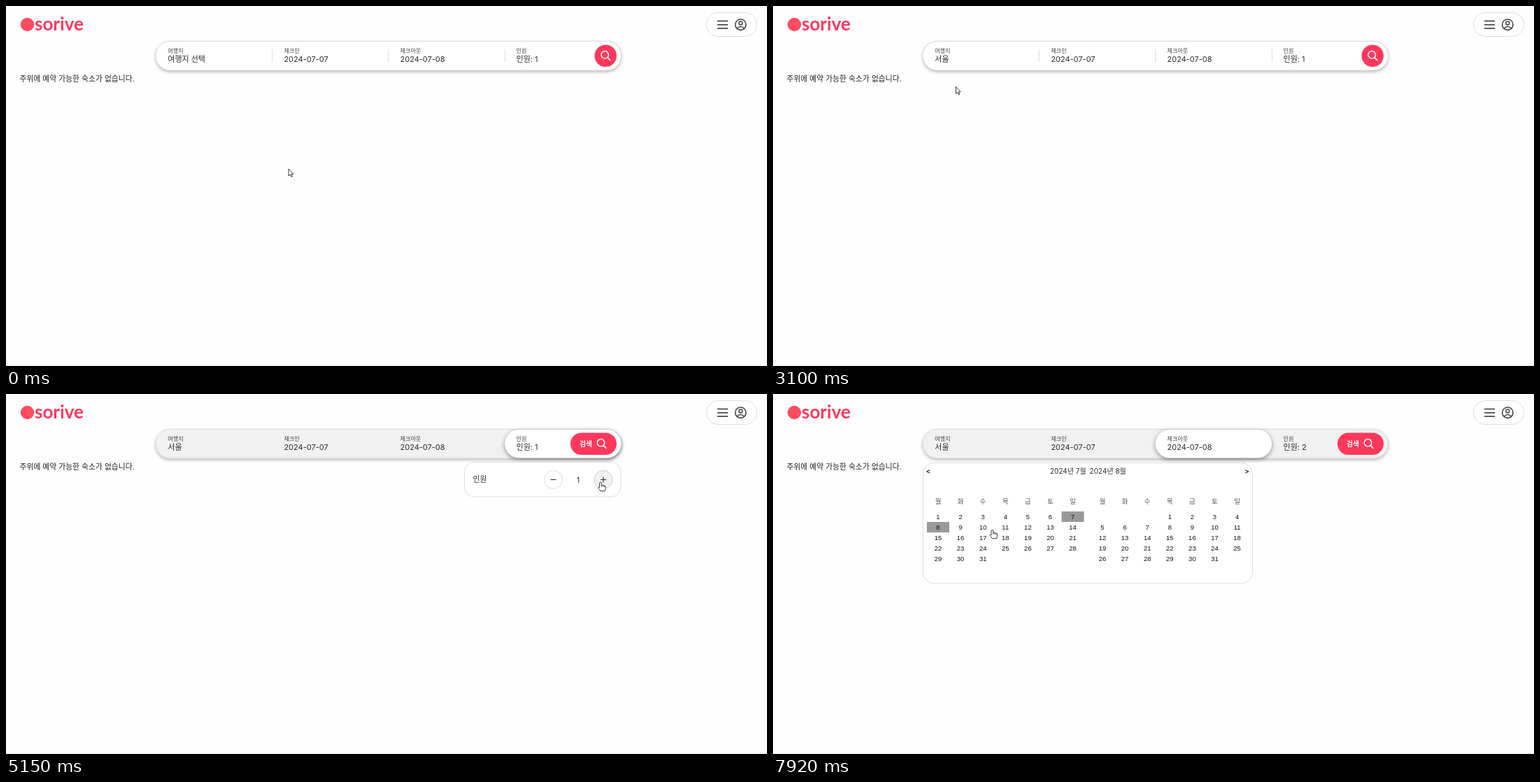
Write an HTML page with a canvas that moves like this. It is 1088x515 px and loops after 7.99 s.

```html
<!DOCTYPE html>
<html lang="ko">
<head>
<meta charset="utf-8">
<title>숙소 검색</title>
<style>
html, body { margin: 0; width: 100%; height: 100%; overflow: hidden; background: #fefefe; }
canvas { display: block; }
</style>
</head>
<body>
<canvas id="stage" width="1088" height="515"></canvas>
<script>
const c = document.getElementById('stage').getContext('2d');
const LOOP = 7990;
const SANS = 'Inter, "Noto Sans CJK KR", "Noto Sans CJK JP", sans-serif';
const ARIAL = '"Liberation Sans", "Noto Sans CJK KR", sans-serif';
const PINK = '#ff385c', LINE = '#dddddd', GREY = '#f1f1f1', INK = '#2b2b2b';
const BAR = { x: 214, y: 50.5, w: 665.5, h: 41.5 };
const SEG = BAR.w / 4;
const REGIONS = ['서울', '부산', '울산', '인천', '대전', '경기', '제주', '강원'];
const PLUS = { x: 854, y: 122.5, r: 13 };

// Cursor moves: start, end, control point, destination
const START = [404, 233];
const MOVES = [
  [440, 1060, 340, 150, 277, 75],
  [2300, 2600, 270, 98, 261.5, 115.5],
  [3300, 4020, 500, 156, 739.5, 110],
  [4030, 4370, 750, 100, 752, 76],
  [4650, 5060, 790, 122, 858, 128],
  [5070, 5150, 854, 127, 850, 126],
  [5610, 6640, 800, 220, 604, 59.5],
  [6760, 7240, 645, 95, 622, 130],
  [7240, 7910, 470, 204, 313.5, 194]
];
const CLICKS = [1740, 2890, 4440, 5210, 6550];
const PRESS = 140, FLASH = 210;

const ARROW = new Path2D('M0 0V10L2.3 8L3.8 11.4L5.4 10.7L3.9 7.4H6.8Z');
const HAND = new Path2D('M-1.4 7.5V1.1Q0-1 1.4 1.1V4.6Q2.6 3.8 3.6 5Q4.9 4.4 5.6 5.6' +
  'Q7 5.2 7.2 6.8V9Q7 11 6 12.8H-.2Q-1 11-3.2 8.6Q-3.6 7-1.4 7.5Z');

function text(str, x, y, size, { color = INK, weight = 400, align = 'left', font = SANS } = {}) {
  c.font = `${weight} ${size}px ${font}`;
  c.fillStyle = color;
  c.textAlign = align;
  c.fillText(str, x, y);
}

function paint(fill, stroke, width = 1) {
  if (fill) { c.fillStyle = fill; c.fill(); }
  if (stroke) { c.strokeStyle = stroke; c.lineWidth = width; c.stroke(); }
}

function box(x, y, w, h, r, fill, stroke) {
  c.beginPath();
  c.roundRect(x, y, w, h, r);
  paint(fill, stroke);
}

function disc(x, y, r, fill, stroke, width) {
  c.beginPath();
  c.arc(x, y, r, 0, Math.PI * 2);
  paint(fill, stroke, width);
}

function line(x1, y1, x2, y2, color, width) {
  c.beginPath();
  c.moveTo(x1, y1);
  c.lineTo(x2, y2);
  paint(null, color, width);
}

function shadowed(blur, dy, alpha, draw) {
  c.save();
  c.shadowColor = `rgba(0,0,0,${alpha})`;
  c.shadowBlur = blur;
  c.shadowOffsetY = dy;
  draw();
  c.restore();
}

function cursorAt(t) {
  let [x, y] = START;
  for (const [t0, t1, cx, cy, ex, ey] of MOVES) {
    if (t < t0) break;
    const p = Math.min(1, (t - t0) / (t1 - t0));
    const u = p * p * (3 - 2 * p), v = 1 - u;
    x = v * v * x + 2 * u * v * cx + u * u * ex;
    y = v * v * y + 2 * u * v * cy + u * u * ey;
  }
  return { x, y };
}

// Counts finished clicks and derives the page state from them
function stateAt(t) {
  const done = CLICKS.filter(s => t >= s + PRESS).length;
  return {
    active: [-1, 0, -1, 3, 3, 2][done],
    place: done < 2 ? '여행지 선택' : '서울',
    guests: done < 4 ? 1 : 2
  };
}

const inside = (p, x, y, w, h) => p.x >= x && p.x < x + w && p.y >= y && p.y < y + h;
const segmentAt = p => inside(p, BAR.x, BAR.y, BAR.w, BAR.h) ? Math.floor((p.x - BAR.x) / SEG) : -1;
const chip = i => ({ x: 226.5 + i % 4 * 50, y: 109.5 + Math.floor(i / 4) * 33, w: 44, h: 27.5 });
const overPlus = p => Math.hypot(p.x - PLUS.x, p.y - PLUS.y) < PLUS.r;

function clickable(p, active) {
  if (segmentAt(p) >= 0) return true;
  if (active === 0) return REGIONS.some((_, i) => {
    const b = chip(i);
    return inside(p, b.x, b.y, b.w, b.h);
  });
  if (active === 3) return overPlus(p);
  return active === 2 && inside(p, 220, 168, 460, 75);
}

function header() {
  disc(30.5, 26.5, 9.7, '#ff4b60');
  text('sorive', 41, 35, 26, { color: PINK, weight: 700, font: 'Lato, sans-serif' });
  box(1001.5, 9.5, 72, 34, 17, '#fff', LINE);
  for (const y of [21.5, 26.8, 32]) line(1017, y, 1032, y, '#444', 1.7);
  disc(1050.3, 26.7, 7.7, null, '#444', 1.6);
  disc(1050.3, 24.6, 2.5, null, '#444', 1.5);
  c.beginPath();
  c.moveTo(1045.2, 32);
  c.quadraticCurveTo(1050.3, 27, 1055.4, 32);
  paint(null, '#444', 1.6);
  text('주위에 예약 가능한 숙소가 없습니다.', 19.5, 107.5, 10.8, { color: '#222' });
  line(0, 514.5, 1088, 514.5, '#e4e4e4', 1);
}

function searchButton(open) {
  box(open ? 807 : 841.5, 55.5, open ? 66 : 31.5, 31.5, 15.75, PINK);
  if (open) text('검색', 820, 74.8, 9.8, { color: '#fff', weight: 700 });
  const x = open ? 850.5 : 856.2;
  disc(x, 69.8, 5.2, null, '#fff', 1.5);
  line(x + 3.8, 73.6, x + 8, 78, '#fff', 1.6);
}

function searchBar(s, pointer) {
  const open = s.active >= 0;
  shadowed(5, 2, .3, () => box(BAR.x, BAR.y, BAR.w, BAR.h, 20.75, open ? GREY : '#fff'));
  box(BAR.x, BAR.y, BAR.w, BAR.h, 20.75, null, LINE);

  const hover = segmentAt(pointer);
  if (open) {
    shadowed(6, 2, .42, () => box(BAR.x + s.active * SEG, 51, SEG, 40.5, 20.25, '#fff'));
  } else {
    if (hover >= 0) box(BAR.x + hover * SEG, 51, SEG, 40.5, 20.25, GREY);
    for (let i = 1; i < 4; i++) {
      const x = Math.floor(BAR.x + i * SEG) + .5;
      line(x, 62, x, 80, LINE, 1);
    }
  }

  const fields = [
    ['여행지', s.place], ['체크인', '2024-07-07'],
    ['체크아웃', '2024-07-08'], ['인원', '인원: ' + s.guests]
  ];
  fields.forEach(([label, value], i) => {
    const x = 231.3 + i * 166.1;
    text(label, x, 67, 8.1, { color: '#444' });
    text(value, x, 80, 11);
  });
  searchButton(open);
}

function regionPanel() {
  box(214.5, 97.5, 218, 84.5, 14, '#fff', LINE);
  REGIONS.forEach((name, i) => {
    const b = chip(i);
    box(b.x, b.y, b.w, b.h, 13.75, '#fff', LINE);
    text(name, b.x + b.w / 2, b.y + 17.3, 9.5, { align: 'center' });
  });
}

function guestPanel(s, pointer) {
  box(655.5, 97.5, 223.5, 49.5, 14, '#fff', LINE);
  text('인원', 667.5, 126.3, 10.8);
  disc(782.5, 122.5, 13, '#fff', LINE);
  disc(PLUS.x, PLUS.y, PLUS.r, overPlus(pointer) ? GREY : '#fff', overPlus(pointer) ? '#ccc' : LINE);
  line(778.5, 122.5, 786.5, 122.5, '#333', 1.1);
  line(850, 122.5, 858, 122.5, '#333', 1.1);
  line(854, 118.5, 854, 126.5, '#333', 1.1);
  text(s.guests, 818, 126.5, 11, { align: 'center' });
}

function month(left, first, marked) {
  const at = i => left + i * 32.1;
  const style = { align: 'center', font: ARIAL, color: '#111' };
  [...'월화수목금토일'].forEach((d, i) => text(d, at(i), 157, 9.5, { align: 'center', color: '#555' }));
  for (let day = 1; day <= 31; day++) {
    const cell = day - 1 + first, x = at(cell % 7), row = Math.floor(cell / 7);
    if (marked.includes(day)) {
      c.fillStyle = '#999';
      c.fillRect(x - 16, 168 + row * 15.05, 32, 15);
    }
    text(day, x, 178.8 + row * 15.05, 9.5, style);
  }
}

function calendarPanel() {
  box(214.5, 98.5, 471, 172.5, 16, '#fff', LINE);
  const arrow = { weight: 700, align: 'center', font: ARIAL, color: '#111' };
  text('<', 222, 113.5, 9.5, arrow);
  text('>', 677.5, 113.5, 9.5, arrow);
  text('2024년 7월', 396, 113.7, 10);
  text('2024년 8월', 452.6, 113.7, 10);
  month(236, 0, [7, 8]);
  month(471, 3, []);
}

function drawPointer(p, hand) {
  c.save();
  c.translate(p.x, p.y);
  const shape = hand ? HAND : ARROW;
  c.fillStyle = '#fff';
  c.fill(shape);
  c.strokeStyle = '#222';
  c.lineWidth = .9;
  c.lineJoin = 'round';
  c.stroke(shape);
  if (hand) {
    line(1.4, 4.6, 1.4, 7, '#222', .7);
    line(3.6, 5, 3.6, 7.2, '#222', .7);
    line(5.6, 5.6, 5.6, 7.4, '#222', .7);
  }
  c.restore();
}

function draw(t) {
  const s = stateAt(t), p = cursorAt(t);
  c.fillStyle = '#fefefe';
  c.fillRect(0, 0, 1088, 515);
  header();
  searchBar(s, p);
  if (s.active === 0) regionPanel();
  if (s.active === 2) calendarPanel();
  if (s.active === 3) guestPanel(s, p);
  if (CLICKS.some(k => t >= k && t < k + FLASH)) disc(p.x, p.y - 1, 9, 'rgba(250,240,30,.65)');
  drawPointer(p, clickable(p, s.active));
}

const begin = performance.now();
function frame() {
  draw((performance.now() - begin) % LOOP);
  requestAnimationFrame(frame);
}
frame();
</script>
</body>
</html>
```
